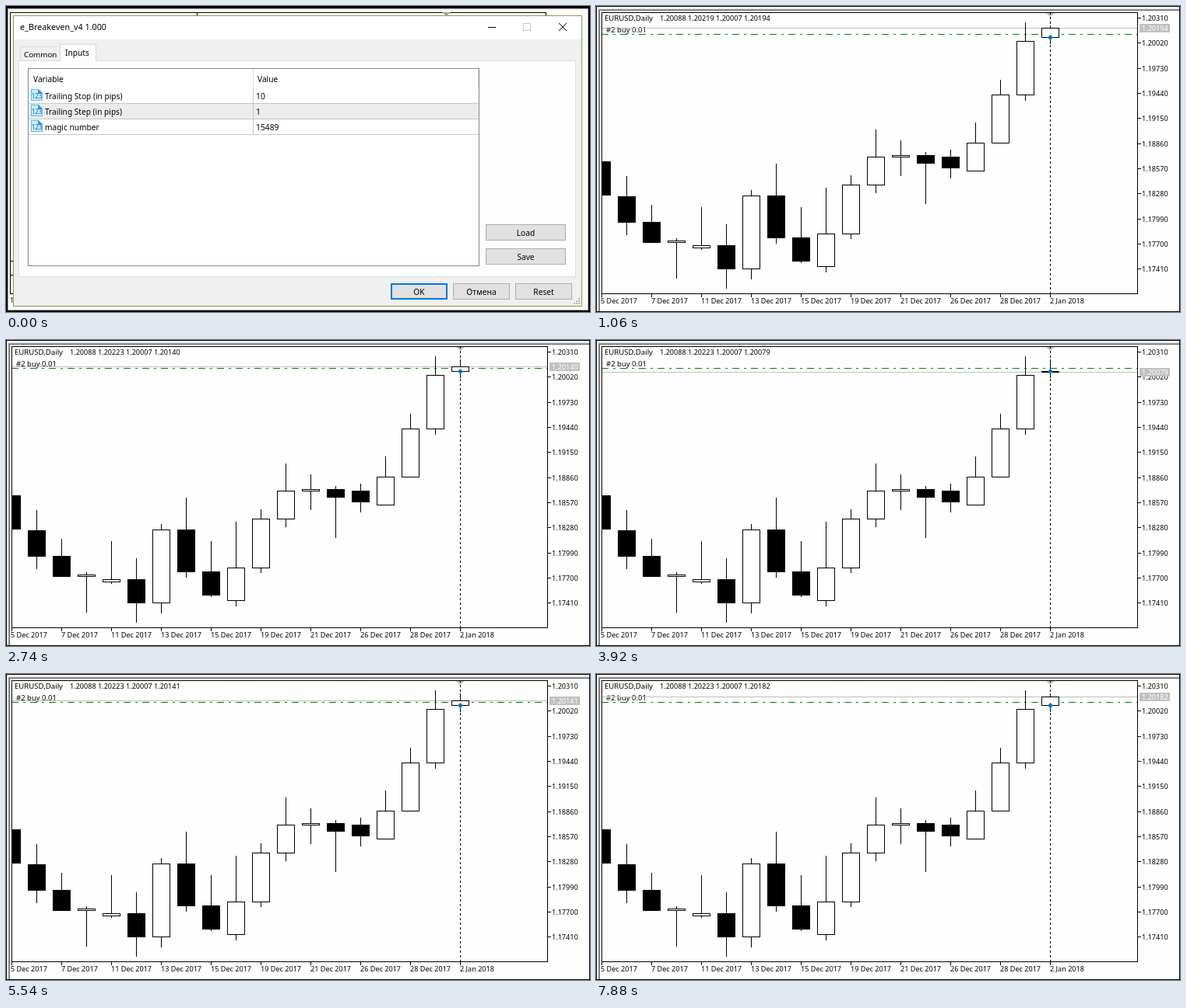
An HTML page with a canvas for the animation above (7.99 s loop, 750 by 394 pixels).

```html
<!DOCTYPE html>
<html lang="en">
<head>
<meta charset="utf-8">
<title>Price chart</title>
<style>
  html, body { margin: 0; width: 100%; height: 100%; overflow: hidden; background: #fff; }
  canvas { display: block; }
</style>
</head>
<body>
<canvas id="stage" width="750" height="394"></canvas>
<script>
const ctx = document.getElementById('stage').getContext('2d');
const LOOP = 7990, START = 500, TICK = 111.8;   // ms
const OPEN = 88, LOW = 7, FIRST_HIGH = 219;     // points above 1.20000
const STEP = 32;                                // px between candles and axis labels
const BLACK = '#000', GREY = '#c0c0c0', PAPER = '#fefefe';

// Turning points of the price: tick, points
const turns = [
  [0, 144], [5, 194], [11, 223], [15, 172], [20, 140], [24, 92], [30, 79], [32, 70], [36, 131],
  [43, 158], [45, 141], [48, 103], [56, 173], [59, 148], [62, 184], [65, 171], [66, 182]
];

// Past days as heights on screen: high, low, close.
// Each day opens at the previous close, plus a gap after a break in trading.
const days = [
  [200, 243, 243], [219, 295, 278], [256, 304, 304], [299, 351, 302], [259, 314, 308], [281, 364, 338],
  [237, 352, 244], [203, 306, 298], [259, 331, 328], [234, 343, 293], [218, 300, 230], [159, 241, 194],
  [173, 219, 192], [188, 255, 202], [185, 222, 208], [150, 212, 176], [95, 176, 114], [21, 122, 45]
];
const gaps = { 1: 2, 4: 9, 9: 7, 14: -8, 15: 4 };
const dates = [5, 7, 11, 13, 15, 19, 21, 26, 28].map(d => `${d} Dec 2017`).concat('2 Jan 2018');

function priceAt(tick) {
  const i = Math.max(1, turns.findIndex(p => p[0] >= tick));
  const [t0, p0] = turns[i - 1], [t1, p1] = turns[i];
  return Math.round(p0 + (p1 - p0) * (tick - t0) / (t1 - t0));
}

function highAt(tick) {
  let high = FIRST_HIGH;
  for (let i = 0; i <= tick; i++) high = Math.max(high, priceAt(i));
  return high;
}

const quote = points => (1.2 + points / 1e5).toFixed(5);
const priceY = points => Math.floor(15.5 + (310 - points) * 32.33 / 290);

function rect(x, y, w, h, color) {
  ctx.fillStyle = color;
  ctx.fillRect(x, y, w, h);
}

function box(x, y, w, h, fill, edge, line = 1) {
  rect(x, y, w, h, edge);
  rect(x + line, y + line, w - 2 * line, h - 2 * line, fill);
}

function text(s, x, y, size, color = BLACK, align = 'left') {
  ctx.font = `${size}px "Noto Sans", "Open Sans", sans-serif`;
  ctx.textAlign = align;
  ctx.fillStyle = color;
  ctx.fillText(s, x, y);
}

function trace(points) {
  ctx.beginPath();
  points.forEach(([x, y]) => ctx.lineTo(x, y));
}

function stroke(points, color, dash = []) {
  trace(points);
  ctx.strokeStyle = color;
  ctx.setLineDash(dash);
  ctx.stroke();
}

function shape(points, color) {
  trace(points);
  ctx.fillStyle = color;
  ctx.fill();
}

function candle(x, open, high, low, close) {
  const top = Math.min(open, close);
  rect(x, high, 1, low - high, BLACK);
  box(x - 11, top, 23, Math.abs(open - close) + 1, close > open ? BLACK : '#fff', BLACK);
}

function header(price, high) {
  text('EURUSD,Daily', 11, 19, 9.6);
  [OPEN, high, LOW, price].forEach((p, i) => text(quote(p), 82 + i * 36, 19, 9.1));
}

function drawFrame() {
  rect(0, 0, 750, 394, BLACK);
  rect(1, 1, 748, 392, PAPER);
  rect(1, 1, 748, 4, '#f0f0f0');
  rect(1, 1, 3, 392, '#f0f0f0');
  ['#a0a0a0', '#696969'].forEach((color, i) => {
    rect(3 + i, 4 + i, 746 - i, 1, color);
    rect(3 + i, 4 + i, 1, 389 - i, color);
  });
  box(7, 8, 689, 363, PAPER, BLACK);
}

function drawAxes() {
  for (let i = 0; i < 11; i++) {
    const y = 15 + Math.round(i * 32.33);
    rect(696, y, 4, 1, BLACK);
    text(quote(310 - i * 290), 701, y + 4, 9.1);
  }
  dates.forEach((d, i) => {
    const x = 7 + i * 2 * STEP;
    rect(x, 371, 1, 4, BLACK);
    text(d, Math.max(6, x - (i ? 0 : 1)), 383, 9.1);
  });
}

function drawCandles(price, high) {
  ctx.save();
  ctx.beginPath();
  ctx.rect(8, 9, 687, 361);
  ctx.clip();
  let open = 200;
  days.forEach(([top, bottom, close], i) => {
    candle(7 + i * STEP, open + (gaps[i] || 0), top, bottom, close);
    open = close;
  });
  const x = 7 + days.length * STEP;
  stroke([[x + 0.5, 8], [x + 0.5, 370]], BLACK, [3, 3]);
  candle(x, priceY(OPEN), priceY(high), priceY(LOW), priceY(price));
  ctx.restore();
}

function drawChart(tick) {
  const price = priceAt(tick), high = highAt(tick), y = priceY(price);
  drawFrame();
  drawAxes();
  shape([[578, 9], [589, 9], [583.5, 14]], GREY);
  header(price, high);
  text('#2 buy 0.01', 13, 34, 9.5);

  rect(8, y, 687, 1, GREY);
  stroke([[7, 36.5], [695, 36.5]], '#008000', [9, 6, 3, 6]);
  rect(7, 36, 1, 1, BLACK);
  drawCandles(price, high);
  shape([[583.5, 37], [587, 40.5], [583.5, 44], [580, 40.5]], '#0070c8');

  rect(698, y - 5, 39, 11, GREY);
  text(quote(price), 701, y + 4, 9.1, '#fff');
}

function button(label, x, y, w, focus) {
  box(x, y, w, 21, '#e1e1e1', focus ? '#0078d7' : '#adadad', focus ? 2 : 1);
  text(label, x + w / 2, y + 14.5, 10.2, BLACK, 'center');
}

function icon(x, y) {
  const page = (d, color) => shape(
    [[x + 1 + d, y + d], [x + 11 - d, y + d], [x + 16 - d, y + 5 + d], [x + 16 - d, y + 15 - d], [x + 1 + d, y + 15 - d]], color);
  page(0, '#5db8e8');
  page(1, '#c9edfc');
  shape([[x + 10, y], [x + 16, y + 6], [x + 10, y + 6]], '#2f9bd8');
  text('123', x + 8.5, y + 12, 8, '#1465b5', 'center');
}

function drawBackdrop() {
  rect(0, 0, 750, 394, BLACK);
  box(2, 3, 746, 389, '#f4f1f4', '#a0a0a0');
  rect(4, 6, 743, 385, PAPER);
  box(5, 8, 689, 363, PAPER, BLACK);
  rect(245, 8, 1, 6, BLACK);
  shape([[560, 8], [571, 8], [565.5, 13]], '#a0a0a0');
  header(priceAt(0), FIRST_HIGH);
  rect(5, 328, 5, 1, BLACK);
  rect(5, 346, 5, 1, BLACK);
  text('1', 5, 382, 9.1);
}

function drawDialog() {
  drawBackdrop();
  box(9, 12, 731, 375, '#f0f0f0', '#7f9f4f');
  rect(10, 13, 729, 30, '#fff');
  text('e_Breakeven_v4 1.000', 18, 31, 10.8);
  rect(619, 27, 10, 1, BLACK);
  box(664, 22, 10, 10, '#fff', '#c4c4c4');
  stroke([[710, 22], [720, 32]], BLACK);
  stroke([[720, 22], [710, 32]], BLACK);

  box(16, 70, 716, 279, '#fdfdfd', '#dcdcdc');
  box(18, 52, 52, 19, '#f0f0f0', '#d9d9d9');
  box(69, 49, 47, 22, '#fdfdfd', '#d9d9d9');
  rect(70, 70, 45, 1, '#fdfdfd');
  text('Common', 23, 66, 9.8);
  text('Inputs', 76, 64, 10.2);

  box(28, 80, 580, 255, '#fff', '#828790');
  rect(317, 82, 1, 24, '#e0e0e0');
  rect(606, 82, 1, 24, '#e0e0e0');
  text('Variable', 35, 98, 10.2);
  text('Value', 323, 98, 10.2);
  rect(29, 126, 578, 19, '#ececec');
  [['Trailing Stop (in pips)', '10'], ['Trailing Step (in pips)', '1'], ['magic number', '15489']]
    .forEach(([name, value], i) => {
      const y = 106 + i * 20;
      rect(29, y + 19, 578, 1, '#c6c6c6');
      icon(31, y + 1);
      text(name, 50, y + 14, 10.15);
      text(value, 321, y + 14, 10.3);
    });
  rect(317, 106, 1, 60, '#c6c6c6');

  ['Load', 'Save'].forEach((label, i) => button(label, 616, 281 + i * 31, 103));
  ['OK', 'Отмена', 'Reset'].forEach((label, i) => button(label, 494 + i * 80, 357, 73, i === 0));
  for (let i = 0; i < 3; i++)
    for (let j = 0; j <= i; j++) rect(735 - j * 3, 376 + i * 3, 2, 2, '#b8b8b8');
}

function frame() {
  const t = performance.now() % LOOP;
  if (t < START) drawDialog();
  else drawChart(Math.min(66, Math.floor((t - START) / TICK)));
  requestAnimationFrame(frame);
}
frame();
</script>
</body>
</html>
```
